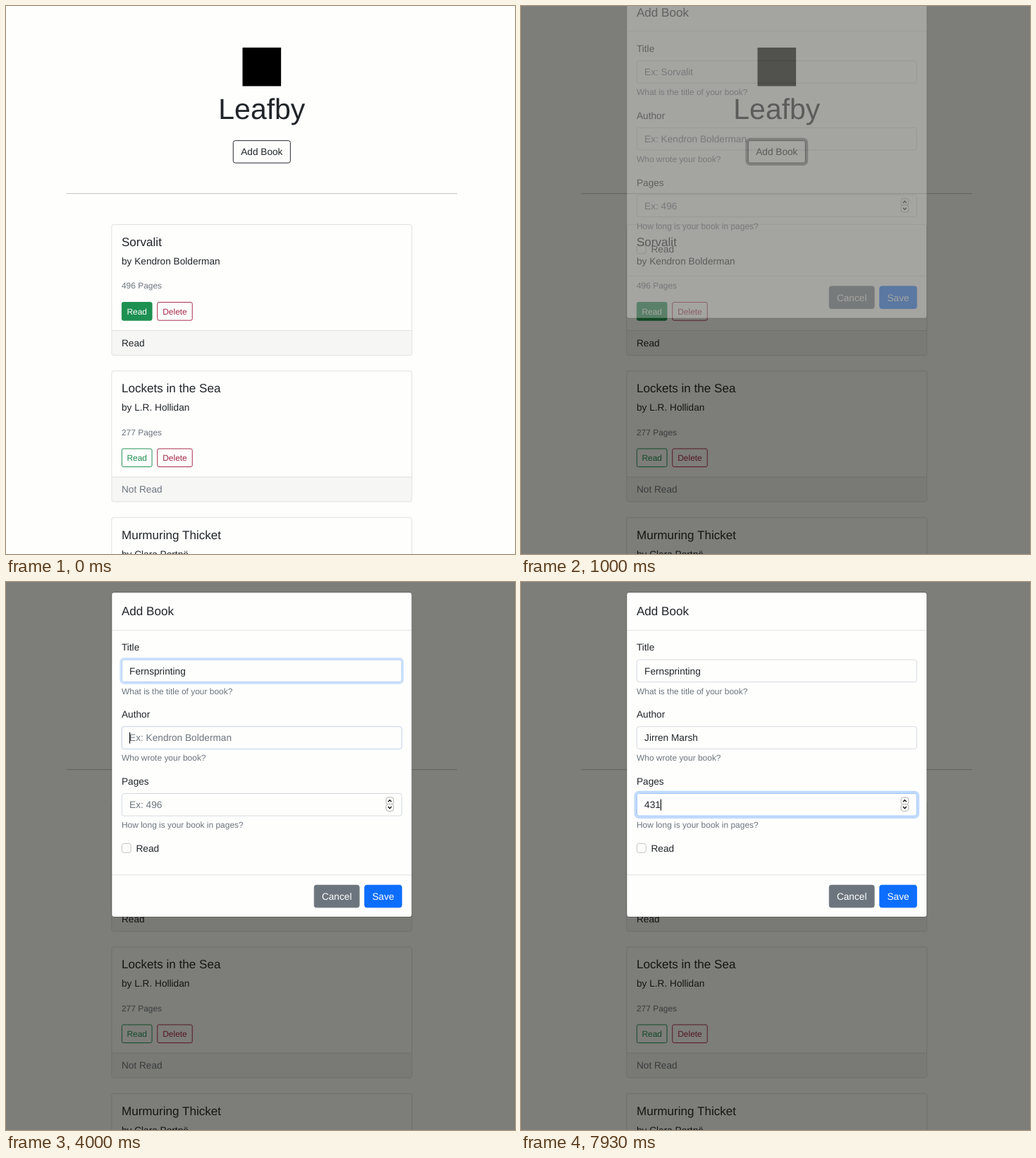
Animation, 722 px wide and 776 px high, one loop 8 s. Source, as an HTML page:

```html
<!DOCTYPE html>
<html lang="en">
<head>
<meta charset="utf-8">
<title>Leafby</title>
<style>
  html, body { margin: 0; width: 722px; height: 776px; overflow: hidden; background: #fefefd; }
  svg { display: block; }
  text {
    font-family: "Liberation Sans", Arial, sans-serif;
    text-rendering: geometricPrecision;
    white-space: pre;
  }
</style>
</head>
<body>
<svg id="stage" width="722" height="776" viewBox="0 0 722 776"></svg>
<script>
const LOOP = 8000, FPS = 15;
const INK = '#212529', MUTED = '#6c757d', PAPER = '#fefefd';
const GREEN = '#1e9052', RED = '#a62a4a';
const VIEW = 'translate(149.45 14.05) scale(.8535)';

// --- markup helpers (layout units, y of text is the middle of its line) ---
const text = (x, mid, str, size = 16, fill = INK, extra = '') =>
  `<text x="${x}" y="${mid + size * 0.358}" font-size="${size}" fill="${fill}" ${extra}>${str}</text>`;

const box = (x, y, w, h, r, fill, stroke, extra = '') =>
  `<rect x="${x + .5}" y="${y + .5}" width="${w - 1}" height="${h - 1}" rx="${r}" fill="${fill}" stroke="${stroke}" ${extra}/>`;

const line = (x, y, w, opacity) =>
  `<rect x="${x}" y="${y}" width="${w}" height="1" opacity="${opacity}"/>`;

const button = (x, y, w, h, label, size, color, solid) =>
  box(x, y, w, h, size > 14 ? 3.5 : 2.6, solid ? color : 'none', color, 'stroke-width="1.15"') +
  text(x + w / 2, y + h / 2, label, size, solid ? '#fff' : color, 'text-anchor="middle"');

function card(y, title, author, pages, read) {
  return `<g transform="translate(0 ${y})">
    <path d="M1 177H499V213q0 4 -4 4H5q-4 0 -4 -4z" opacity=".03"/>
    ${box(0, 0, 500, 218, 3.5, 'none', '#000', 'stroke-opacity=".14"')}
    ${line(1, 176, 498, .14)}
    ${text(17, 29, title, 20)}
    ${text(17, 61, 'by ' + author)}
    ${text(17, 102, pages + ' Pages', 14, MUTED)}
    ${button(17, 129, 51, 31, 'Read', 14, GREEN, read)}
    ${button(76, 129, 59, 31, 'Delete', 14, RED)}
    ${text(17, 197, read ? 'Read' : 'Not Read', 16, read ? INK : MUTED)}
  </g>`;
}

const fields = [
  { label: 'Title', hint: 'Ex: Sorvalit', help: 'What is the title of your book?',
    value: 'Fernsprinting', focus: 1780, blur: 3948,
    typed: [[35, 1], [39, 2], [40, 4], [41, 5], [45, 6], [47, 7], [48, 8], [52, 9], [54, 11], [55, 12], [58, 13]] },
  { label: 'Author', hint: 'Ex: Kendron Bolderman', help: 'Who wrote your book?',
    value: 'Jirren Marsh', focus: 3948, blur: 6450,
    typed: [[69, 2], [74, 3], [76, 4], [77, 5], [78, 6], [82, 7], [86, 8], [89, 9], [91, 10], [93, 11], [95, 12]] },
  { label: 'Pages', hint: 'Ex: 496', help: 'How long is your book in pages?',
    value: '431', focus: 6450, blur: Infinity,
    typed: [[114, 2], [119, 3]] }
];

const field = (f, i) => `<g class="field" transform="translate(0 ${80 + i * 111})">
    ${text(17, 12, f.label)}
    <rect class="ring" fill="none" stroke="#0d6efd"/>
    ${box(17, 32, 466, 38, 3.5, PAPER, '#ced4da', 'class="edge"')}
    ${text(30, 51, '', 16, INK, 'class="value"')}
    <rect class="caret" y="42" width="1.3" height="18.5"/>
    ${text(17, 84.5, f.help, 14, MUTED)}
  </g>`;

const chevron = (y, d) =>
  box(456, y - 6.5, 13.5, 13, 4, PAPER, '#a5a5a5') +
  `<path d="M459.9 ${y + 1.6 * d}L462.7 ${y - 1.4 * d}L465.5 ${y + 1.6 * d}" fill="none" stroke="#111" stroke-width="1.6"/>`;

const stage = document.getElementById('stage');
stage.innerHTML = `
  <g transform="${VIEW}">
    <rect x="218" y="52.5" width="64" height="64"/>
    ${text(250, 153.4, 'Leafby', 48, INK, 'text-anchor="middle"')}
    <rect id="addRing" fill="none" stroke="${INK}"/>
    ${box(202, 206.4, 96, 38, 3.5, INK, INK, 'id="addBox" stroke-width="1.15"')}
    ${text(250, 225.6, 'Add Book', 16, INK, 'id="addText" text-anchor="middle"')}
    ${line(-75.2, 294.3, 650, .27)}
    ${card(345.6, 'Sorvalit', 'Kendron Bolderman', 496, true)}
    ${card(588.6, 'Lockets in the Sea', 'L.R. Hollidan', 277, false)}
    ${card(831.6, 'Murmuring Thicket', 'Clara Portnë', 416, false)}
  </g>
  <rect id="backdrop" width="722" height="776" fill="#080800"/>
  <g transform="${VIEW}"><g id="modal">
    ${box(0, 0, 500, 540, 4.5, 'none', '#000', 'stroke-opacity=".25"')}
    <rect x="1" y="1" width="498" height="538" rx="3.8" fill="${PAPER}"/>
    ${text(17, 32, 'Add Book', 20)}
    ${line(1, 63, 498, .13)}
    ${fields.map(field).join('')}
    ${chevron(346.7, 1)}${chevron(357.8, -1)}
    ${box(17, 417, 16, 16, 3.5, PAPER, '#b9b9b9')}
    ${text(41, 425, 'Read')}
    ${line(1, 469, 498, .13)}
    ${button(336.7, 486, 75.8, 38, 'Cancel', 16, MUTED, true)}
    ${button(420.5, 486, 62.5, 38, 'Save', 16, '#0d6efd', true)}
  </g></g>`;

const byId = id => document.getElementById(id);
const set = (el, attrs) => { for (const k in attrs) el.setAttribute(k, attrs[k]); };
const parts = [...stage.querySelectorAll('.field')].map(g => ({
  ring: g.querySelector('.ring'), edge: g.querySelector('.edge'),
  value: g.querySelector('.value'), caret: g.querySelector('.caret')
}));

// --- timing helpers ---
const bezier = (x1, x2) => x => {
  let lo = 0, hi = 1;
  for (let i = 0; i < 24; i++) {
    const s = (lo + hi) / 2, u = 1 - s;
    if (3 * u * u * s * x1 + 3 * u * s * s * x2 + s * s * s < x) lo = s; else hi = s;
  }
  return 3 * (1 - lo) * lo * lo + lo * lo * lo;
};
const easeOut = bezier(0, .58), easeInOut = bezier(.42, .58);
const ramp = (t, start, span) => Math.min(1, Math.max(0, (t - start) / span));
const ease = (t, start, span = 150) => easeInOut(ramp(t, start, span));
const mix = (a, b, p) => `rgb(${a.map((v, i) => Math.round(v + (b[i] - v) * p))})`;

function setRing(el, x, y, w, h, spread, opacity) {
  set(el, {
    x: x - spread / 2, y: y - spread / 2, width: w + spread, height: h + spread,
    rx: 4 + spread / 2, 'stroke-width': spread, 'stroke-opacity': opacity
  });
}

function drawButton(t) {
  const hover = ease(t, 455) - ease(t, 848);
  const ring = ramp(t, 795, 85);
  set(byId('addBox'), { 'fill-opacity': hover });
  set(byId('addText'), { fill: mix([33, 37, 41], [255, 255, 255], hover) });
  setRing(byId('addRing'), 202, 206.4, 96, 38, 4 * ring, .5 * ring);
}

function drawField(f, el, t, tick) {
  const p = ease(t, f.focus) - (f.blur < LOOP ? ease(t, f.blur) : 0);
  setRing(el.ring, 17, 32, 466, 38, 4 * p, .25 * p);
  set(el.edge, { stroke: mix([206, 212, 218], [134, 183, 254], p) });

  const count = f.typed.reduce((n, [at, len]) => tick >= at ? len : n, 0);
  el.value.textContent = count ? f.value.slice(0, count) : f.hint;
  set(el.value, { fill: count ? INK : MUTED });

  const active = t >= f.focus && t < f.blur;
  const end = count ? el.value.getComputedTextLength() : 0;
  set(el.caret, { x: 30 + end, opacity: active ? 1 : 0 });
}

function draw(ms) {
  const tick = Math.floor((ms % LOOP + 4) * FPS / 1000);
  const t = tick * 1000 / FPS;
  drawButton(t);
  set(byId('backdrop'), { opacity: .52 * ramp(t, 845, 150) });
  set(byId('modal'), {
    opacity: ramp(t, 954, 150),
    transform: `translate(0 ${-50 * (1 - easeOut(ramp(t, 954, 300)))})`
  });
  fields.forEach((f, i) => drawField(f, parts[i], t, tick));
}

function loop() {
  draw(performance.now());
  requestAnimationFrame(loop);
}
loop();
</script>
</body>
</html>
```
